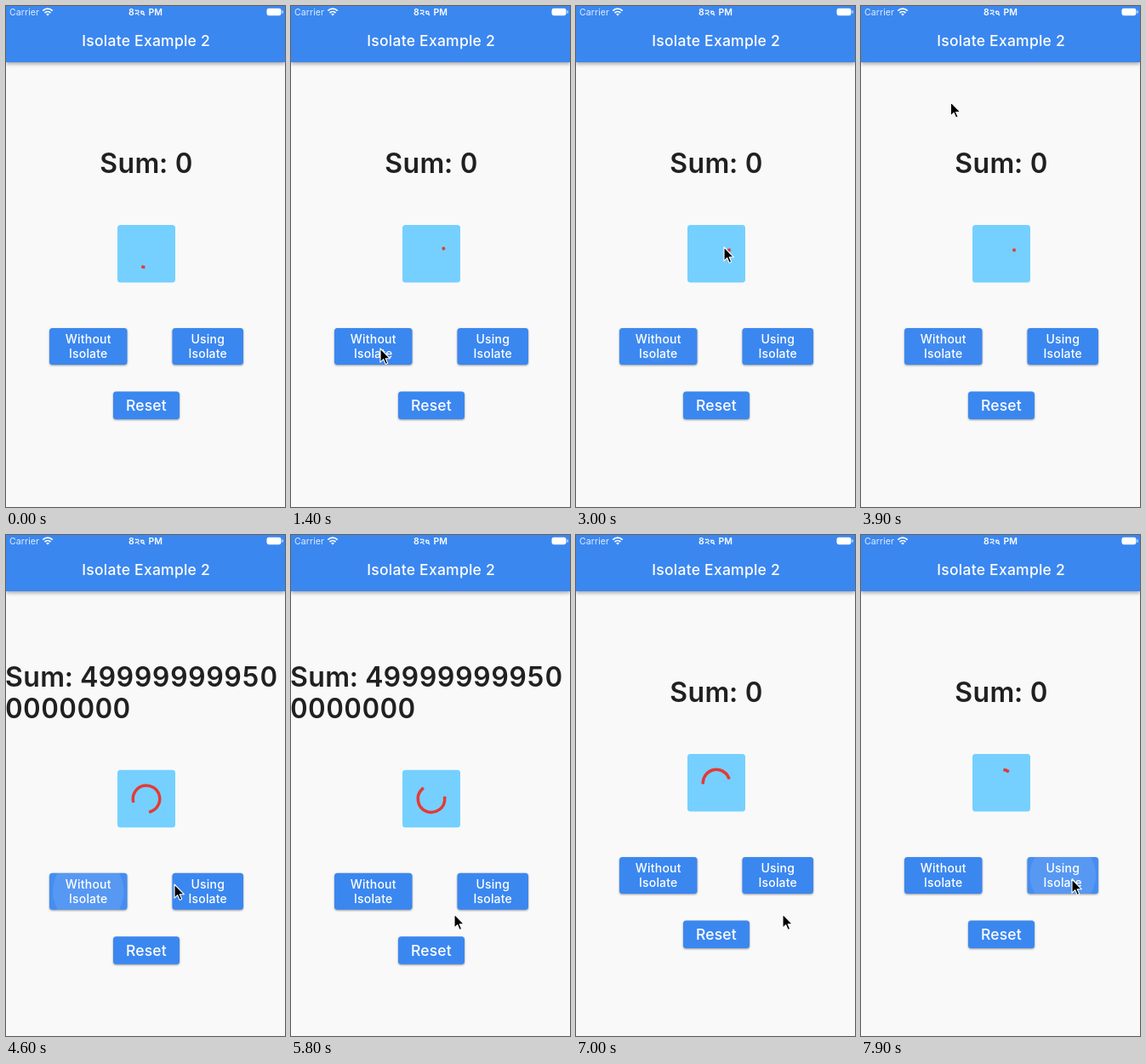
An HTML page that plays this animation: 328x588 px, repeating every 8 s.

```html
<!DOCTYPE html>
<html lang="en">
<head>
<meta charset="utf-8">
<title>Isolate Example 2</title>
<style>
  html, body { margin: 0; width: 100%; height: 100%; overflow: hidden; background: #f9f9f9; }
  svg { display: block; width: 328px; height: 588px; }
  text { font-family: Inter, Roboto, sans-serif; font-weight: 500; fill: #fff; }
  .sum { font-weight: 600; font-size: 32px; fill: #202020; letter-spacing: .4px; font-feature-settings: "tnum"; }
  .mid { text-anchor: middle; }
  .label { font-size: 14px; letter-spacing: .2px; }
  .face { fill: #3b87f0; filter: drop-shadow(0 1.4px 1.3px rgba(0, 0, 0, .38)); }
</style>
</head>
<body>
<svg viewBox="0 0 328 588">
  <rect width="328" height="588" fill="#f9f9f9"/>
  <rect width="328" height="66" fill="#3b87f0" style="filter:drop-shadow(0 2px 2px rgba(0,0,0,.34))"/>

  <text x="4" y="11" font-size="10.5" style="font-weight:400" opacity=".85" letter-spacing=".1">Carrier</text>
  <g fill="none" stroke="#fff" stroke-width="1.8">
    <path d="M43.3 5.6a8 8 0 0 1 11.4 0M45.5 8a5 5 0 0 1 7 0"/>
    <path d="M49 11.6l-1.9-2a2.7 2.7 0 0 1 3.8 0z" fill="#fff" stroke="none"/>
    <path d="M153 6q2-2 3 0t-3 2.500q2 0 3.500 2.500M159 5.500q-1 4 1.500 4t1-3q-2-1-2 1M161 9l2 2" stroke-width="1.100"/>
  </g>
  <text x="144" y="11" font-size="10.500" style="font-weight:600">8:</text>
  <text x="167.500" y="11" font-size="10.500" style="font-weight:600">PM</text>
  <rect x="306.500" y="2.800" width="17" height="8.400" rx="2.400" fill="#fff"/>
  <rect x="324.400" y="5.300" width="1.500" height="3.400" rx=".7" fill="#fff" opacity=".7"/>

  <text class="mid" x="164.700" y="47" font-size="17.500" letter-spacing=".25">Isolate Example 2</text>

  <text id="zero" class="sum mid" x="165" y="196">Sum: 0</text>
  <g id="big">
    <text class="sum" x="-1" y="177.500">Sum: 49999999950</text>
    <text class="sum" x="-1" y="215">0000000</text>
  </g>

  <g id="body">
    <rect x="131" y="257" width="68" height="67.500" rx="3.500" fill="#75d0ff"/>
    <path id="arc" fill="none" stroke="#e53a35" stroke-width="3.500" stroke-linecap="square"/>
    <g id="buttons"></g>
  </g>

  <path id="cursor" d="M0 0V16.200L3.700 12.700L6.200 18.400L8.700 17.300L6.200 11.700H11.300Z"
        fill="#000" stroke="#fff" stroke-width="1.100" stroke-linejoin="round"/>
</svg>
<script>
const $ = id => document.getElementById(id);
const clamp = v => Math.min(1, Math.max(0, v));
const LOOP = 8000, STEP = 100;
const FREEZE = 1430, RESUME = 4450, CLEAR = 6420;

// Cursor tip: time, x, y
const path = [
  [100, 332, 545], [600, 160, 452], [900, 79, 398], [1000, 74, 399], [1200, 95, 403],
  [1400, 105, 402], [1700, 105, 402], [2050, 199, 289], [2350, 71, 345], [2600, 170, 402],
  [2700, 180, 400], [3000, 174, 283], [3250, 89, 43], [3550, 172, 395], [3650, 172, 395],
  [4000, 89, 43], [4200, 89, 43], [4600, 198, 410], [5000, 204, 413], [5400, 227, 484],
  [5800, 192, 445], [6100, 168, 490], [6300, 168, 497], [6600, 168, 497], [7000, 243, 445],
  [7200, 246, 457], [7600, 248, 404], [8000, 248, 404]
];

function cursorAt(t) {
  const i = path.findIndex(k => k[0] > t);
  if (i < 1) return [400, 600];
  const [t0, x0, y0] = path[i - 1], [t1, x1, y1] = path[i];
  const u = (t - t0) / (t1 - t0), s = u * u * (3 - 2 * u);
  return [x0 + (x1 - x0) * s, y0 + (y1 - y0) * s];
}

// cubic-bezier(.4, 0, .2, 1)
function fastOutSlowIn(x) {
  x = clamp(x);
  let a = 0, b = 1;
  for (let i = 0; i < 24; i++) {
    const m = (a + b) / 2, n = 1 - m;
    if (1.2 * m * n * n + .6 * m * m * n + m ** 3 < x) a = m; else b = m;
  }
  return a * a * (3 - 2 * a);
}

// Material indeterminate progress arc
function arcPath(t) {
  const phase = (.94 + t / 1333) % 1;
  const head = fastOutSlowIn(phase * 2), tail = fastOutSlowIn(phase * 2 - 1);
  const start = (110 + t / 2222 * 360 + phase * 90 + tail * 270) * Math.PI / 180;
  const sweep = Math.max((head - tail) * 1.5 * Math.PI, .003);
  const at = a => `${165 + 15.75 * Math.cos(a)} ${291 + 15.75 * Math.sin(a)}`;
  return `M${at(start)}A15.75 15.75 0 ${+(sweep > Math.PI)} 1 ${at(start + sweep)}`;
}

function button(id, x, y, w, h, label) {
  const box = `x="${x}" y="${y}" width="${w}" height="${h}" rx="3.5"`;
  const cx = x + w / 2;
  $("buttons").innerHTML += `<clipPath id="${id}Clip"><rect ${box}/></clipPath>
    <rect class="face" ${box}/>
    <g id="${id}" clip-path="url(#${id}Clip)" fill="#fff">
      <rect ${box} opacity=".3"/><circle cx="${cx}" cy="${y + h / 2}" opacity=".7"/></g>` + label(cx);
  const size = Math.hypot(w, h) / 2;
  return age => {
    const g = $(id);
    g.setAttribute("opacity", age < 0 ? 0 : .18 * clamp(age / 75) * clamp((600 - age) / 375));
    g.lastElementChild.setAttribute("r", size * (.3 + .7 * clamp(age / 225)));
  };
}
const twoLines = top => cx =>
  `<text class="mid label" x="${cx}" y="396">${top}</text><text class="mid label" x="${cx}" y="413">Isolate</text>`;

const pressWithout = button("without", 51, 378, 91.5, 43, twoLines("Without"));
const pressUsing = button("using", 195.5, 378, 83.5, 43, twoLines("Using"));
const pressReset = button("reset", 126, 452.5, 78, 32.5,
  cx => `<text class="mid" x="${cx}" y="475" font-size="17.5" letter-spacing=".2">Reset</text>`);

function draw(t) {
  const frozen = t >= FREEZE && t < RESUME;
  const summed = t >= RESUME && t < CLEAR;
  $("zero").style.display = summed ? "none" : "";
  $("big").style.display = summed ? "" : "none";
  $("body").setAttribute("transform", `translate(0 ${summed ? 18.7 : 0})`);
  $("arc").setAttribute("d", arcPath(frozen ? FREEZE : t));
  pressWithout(frozen ? 20 : t < FREEZE ? -1 : t - RESUME + 20);
  pressReset(t - CLEAR + 20);
  pressUsing(t - 7730);
  $("cursor").setAttribute("transform", `translate(${cursorAt(t)})`);
}

function tick() {
  draw(Math.floor(performance.now() % LOOP / STEP) * STEP);
  requestAnimationFrame(tick);
}
tick();
</script>
</body>
</html>
```
